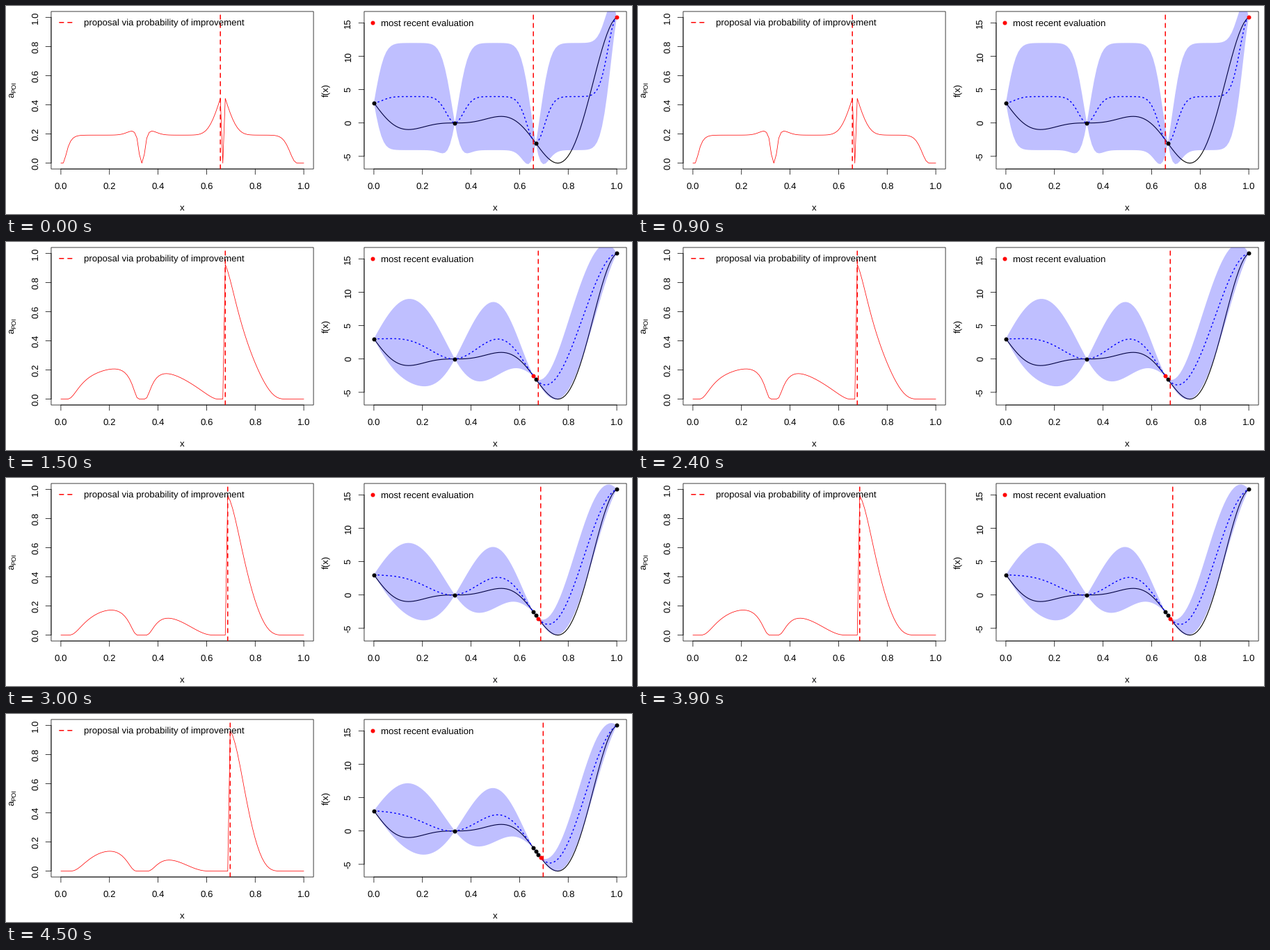
Animation of 900 by 300 pixels, one loop 6 s. Source, as a matplotlib script:

```python
import math
import numpy as np
import matplotlib.pyplot as plt
from matplotlib.animation import FuncAnimation
from matplotlib.lines import Line2D
from matplotlib.patches import Polygon, Rectangle

W, H, DPI = 900, 300, 100
PX = 72 / DPI                      # points per pixel
FONT = 13.2
LINE = 1.2 * FONT                  # height of one margin line
CHAR = 0.9 * FONT
THIN, MEDIUM, THICK = 0.75, 1.1, 1.5
DASHED, DOTTED = (0, (4, 4)), (0, (1, 3))
TOP, BOTTOM = 0.5 * LINE, H - 4.1 * LINE
STEPS = 4
POWER = 1.95                       # exponent of the correlation function

plt.rcParams["font.family"] = "Liberation Sans"
plt.rcParams["text.hinting"] = "none"


# ---- Bayesian optimisation ----
def objective(x):
    return (6 * x - 2) ** 2 * np.sin(12 * x - 4)


def correlation(a, b, theta):
    return np.exp(-(np.abs(a[:, None] - b[None, :]) / theta) ** POWER)


def fit(x, y, theta):
    """Constant-trend kriging: inverse correlation, trend, variance, likelihood."""
    corr = correlation(x, x, theta)
    inv = np.linalg.inv(corr)
    mu = inv.sum(0) @ y / inv.sum()
    var = (y - mu) @ inv @ (y - mu) / len(x)
    loglik = -0.5 * (len(x) * math.log(var) + np.linalg.slogdet(corr)[1])
    return inv, mu, var, loglik


def predict(x, y, theta):
    inv, mu, var, _ = fit(x, y, theta)
    k = correlation(grid, x, theta)
    mean = mu + k @ inv @ (y - mu)
    trend = 1 - k @ inv.sum(0)
    rel = 1 - np.einsum("ij,jk,ik->i", k, inv, k) + trend ** 2 / inv.sum()
    rel[rel < 1e-8] = 0
    return mean, np.sqrt(var * rel)


def improvement_probability(mean, sd, best):
    z = (best - mean) / np.where(sd > 0, sd, 1)
    cdf = np.array([0.5 * (1 + math.erf(v / math.sqrt(2))) for v in z])
    return np.where(sd > 0, cdf, 0)


def optimise():
    x = np.linspace(0, 1, 4)
    thetas = np.geomspace(0.05, 1, 500)
    history = []
    for step in range(STEPS):
        y = objective(x)
        # the first four points leave the length scale undetermined
        theta = 0.0513 if step == 0 else max(thetas, key=lambda t: fit(x, y, t)[3])
        mean, sd = predict(x, y, theta)
        poi = improvement_probability(mean, sd, y.min())
        proposal = grid[poi.argmax()]
        history.append((x, y, mean, sd, poi, proposal))
        x = np.append(x, proposal)
    return history


grid = np.linspace(0, 1, 100)
truth = objective(grid)
history = optimise()

# ---- Drawing, in pixel coordinates ----
fig = plt.figure(figsize=(W / DPI, H / DPI), dpi=DPI, facecolor="white")
ax = fig.add_axes([0, 0, 1, 1])
ax.set(xlim=(0, W), ylim=(H, 0))
ax.axis("off")


def line(x, y, color="black", width=THIN, style="-", z=2, clip=None):
    item = Line2D(x, y, color=color, lw=width * PX, ls=style, zorder=z,
                  solid_capstyle="round", dash_capstyle="round",
                  solid_joinstyle="round", dash_joinstyle="round")
    item.set_snap(False)
    ax.add_line(item)
    if clip is not None:
        item.set_clip_path(clip)
    return item


def dots(x, y, color, z=6):
    item = Line2D(x, y, ls="", marker="o", ms=6 * PX, mew=0, color=color, zorder=z)
    item.set_snap(False)
    return ax.add_line(item)


def label(x, y, text, ha="center", rotation=0, size=FONT):
    ax.text(x, y, text, ha=ha, va="baseline", rotation=rotation,
            rotation_mode="anchor", fontsize=size * PX, zorder=8)


class Panel:
    def __init__(self, offset, low, high, ticks, fmt):
        self.left = offset + 4.1 * LINE
        self.right = offset + W / 2 - 0.5 * LINE
        self.low, self.high = low, high
        frame = (self.left, TOP), self.right - self.left, BOTTOM - TOP
        self.clip = Rectangle(*frame, transform=ax.transData)
        border = Rectangle(*frame, fill=False, ec="black", lw=THIN * PX, zorder=1)
        border.set_snap(False)
        ax.add_patch(border)
        self.axes(ticks, fmt)

    def x(self, v):
        w = self.right - self.left
        return self.left + w * (0.04 + np.asarray(v)) / 1.08

    def y(self, v):
        h = BOTTOM - TOP
        t = (np.asarray(v) - self.low) / (self.high - self.low)
        return BOTTOM - h * (0.04 + t) / 1.08

    def axes(self, ticks, fmt):
        tick = LINE / 2
        xs = np.linspace(0, 1, 6)
        line(self.x([0, 1]), [BOTTOM] * 2)
        line([self.left] * 2, self.y([ticks[0], ticks[-1]]))
        for v in xs:
            line([self.x(v)] * 2, [BOTTOM, BOTTOM + tick])
            label(self.x(v), BOTTOM + 1.8 * LINE, f"{v:.1f}")
        for v in ticks:
            line([self.left, self.left - tick], [self.y(v)] * 2)
            label(self.left - 1.2 * LINE, self.y(v), fmt.format(v), rotation=90)
        label((self.left + self.right) / 2, BOTTOM + 3.8 * LINE, "x")

    def plot(self, x, y, **style):
        return line(self.x(x), self.y(y), clip=self.clip, **style)

    def marker_line(self):
        return line([0, 0], [BOTTOM, TOP], "red", THICK, DASHED, z=7, clip=self.clip)


middle = (TOP + BOTTOM) / 2
legend_y = TOP + LINE
legend_base = legend_y + 4.7

left = Panel(0, 0, 1, np.linspace(0, 1, 6), "{:.1f}")
label(11.8, middle + 10.7, "a", ha="left", rotation=90)
label(14.25, middle + 3.3, "POI", ha="left", rotation=90, size=0.7 * FONT)
key_x = left.left + CHAR
line([key_x, key_x + 2 * CHAR], [legend_y] * 2, "red", THICK, DASHED)
label(key_x + 3 * CHAR, legend_base, "proposal via probability of improvement", ha="left")

right = Panel(W / 2, truth.min(), truth.max(), range(-5, 16, 5), "{}")
label(right.left - 3.2 * LINE, middle, "f(x)", rotation=90)
key_x = right.left + CHAR
dots([key_x], [legend_y], "red")
label(key_x + CHAR, legend_base, "most recent evaluation", ha="left")

poi_line = left.plot(grid, 0 * grid, color="red", z=3)
right.plot(grid, truth, width=MEDIUM, z=3)
band = Polygon([(0, 0), (1, 1), (2, 2)], fc=(0, 0, 1, 0.25), ec="none", zorder=4)
ax.add_patch(band)
band.set_clip_path(right.clip)
mean_line = right.plot(grid, 0 * grid, color="blue", width=THICK, style=DOTTED, z=5)
known, latest = dots([], [], "black"), dots([], [], "red")
proposals = left.marker_line(), right.marker_line()


def update(step):
    x, y, mean, sd, poi, proposal = history[step]
    poi_line.set_ydata(left.y(poi))
    mean_line.set_ydata(right.y(mean))
    edge = np.concatenate([mean + sd, (mean - sd)[::-1]])
    band.set_xy(np.column_stack([right.x(np.append(grid, grid[::-1])), right.y(edge)]))
    known.set_data(right.x(x[:-1]), right.y(y[:-1]))
    latest.set_data(right.x(x[-1:]), right.y(y[-1:]))
    for panel, item in zip((left, right), proposals):
        item.set_xdata([panel.x(proposal)] * 2)
    return poi_line, mean_line, band, known, latest, *proposals


anim = FuncAnimation(fig, update, frames=STEPS, init_func=lambda: update(0),
                     interval=1500, repeat=True, repeat_delay=0)
plt.show()
```
